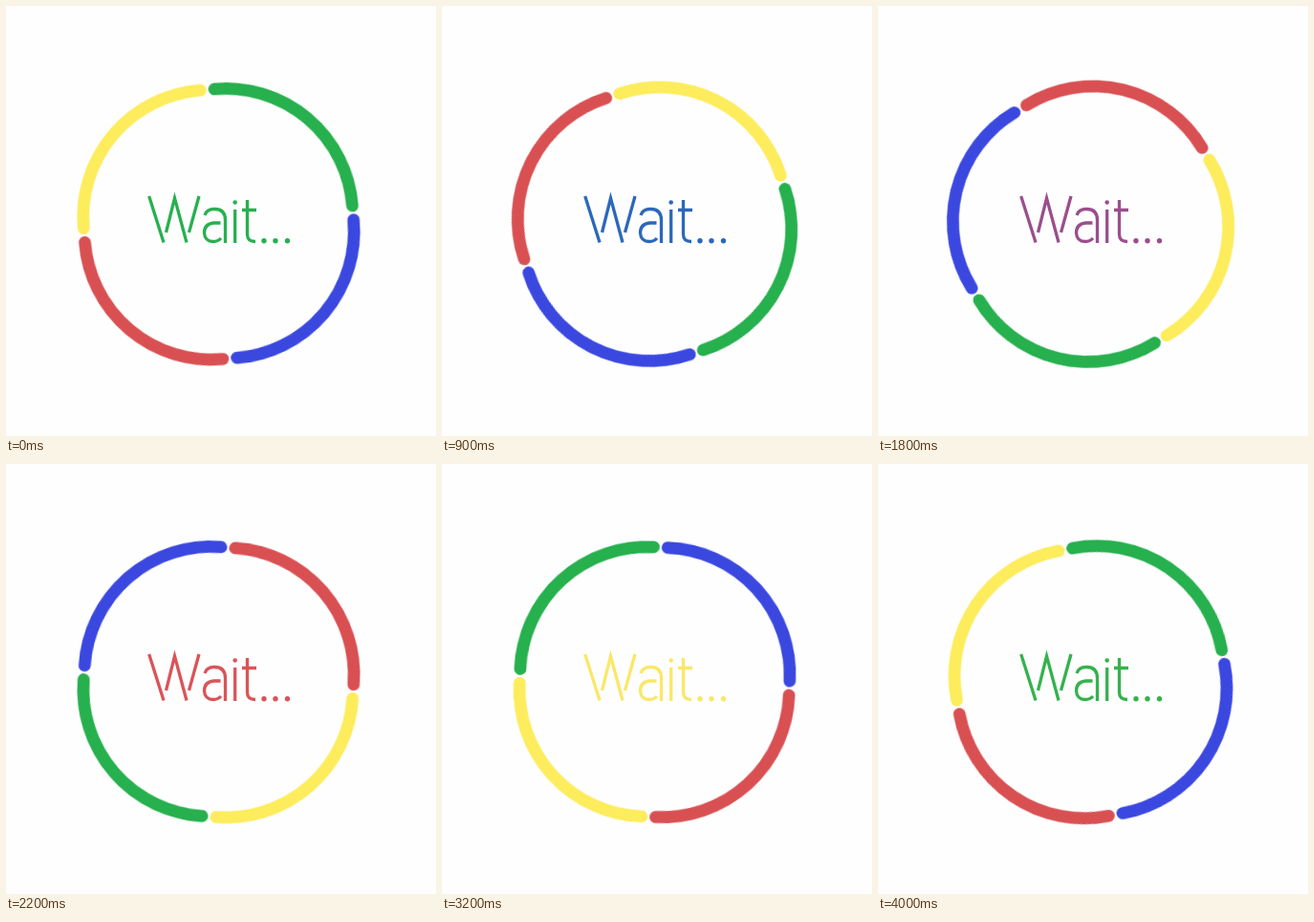
An HTML page for the animation above (4100 ms loop, 450 px wide and 450 px high).

```html
<!DOCTYPE html>
<html lang="en">
<head>
<meta charset="utf-8">
<title>Wait...</title>
<style>
  html, body { margin: 0; width: 100%; height: 100%; overflow: hidden; background: #fefefe; }
  svg { display: block; width: 450px; height: 450px; }
  path { fill: none; stroke-linecap: round; }
  #ring path { stroke-width: 12.8; }
  #word { color: #27b050; stroke: currentColor; stroke-width: 3.3; }
  #word path { stroke-linecap: butt; stroke-linejoin: miter; }
  #word circle { fill: currentColor; stroke: none; }
</style>
</head>
<body>
<svg viewBox="0 0 450 450" role="img" aria-label="Wait...">
  <g transform="translate(222.5 228.2)"><g id="ring"></g></g>
  <g id="word">
    <!-- stencil lettering: W, a, i, t, dots -->
    <path d="M149.7 199L165 247.5M167.5 237L176.5 201L189 247.5M191.5 237L202 199"/>
    <path d="M208 219Q210 212.5 218 212.5Q229.5 212.5 229.5 224V248"/>
    <path d="M224.500 227H217.500Q207.500 228 207.500 237.500Q208 246.500 217 246.500Q222 246.500 225 243"/>
    <path d="M239.700 213V248"/>
    <path d="M252.500 203V239Q252.500 246.500 261 246.500M247 213.500H262"/>
    <circle cx="239.700" cy="205.500" r="2.300"/>
    <circle cx="270" cy="245.700" r="2.700"/>
    <circle cx="282" cy="245.700" r="2.700"/>
    <circle cx="294.500" cy="245.700" r="2.700"/>
  </g>
</svg>
<script>
  const LOOP = 4100, FRAMES = 41, STEPS = 61;
  const ring = document.getElementById('ring');
  const word = document.getElementById('word');

  // Clockwise, each arc a little more curved than the full circle.
  ['#27b04e', '#3b48e0', '#d95053', '#fdec5c'].forEach((color, i) => {
    const arc = document.createElementNS(ring.namespaceURI, 'path');
    arc.setAttribute('d', 'M-94.5 -105A132.8 132.8 0 0 1 94.5 -105');
    arc.setAttribute('stroke', color);
    arc.setAttribute('transform', `rotate(${45 + 90 * i})`);
    ring.append(arc);
  });

  const hues = [
    [0, 39, 176, 80], [900, 43, 104, 186], [1150, 62, 74, 204],
    [1400, 91, 72, 192], [2200, 218, 84, 88], [2700, 248, 165, 98],
    [3200, 250, 231, 104], [4000, 52, 178, 78], [4100, 39, 176, 80]
  ];

  function hueAt(t) {
    const i = hues.findIndex(h => h[0] > t);
    const a = hues[i - 1], b = hues[i];
    const p = (t - a[0]) / (b[0] - a[0]);
    const rgb = [1, 2, 3].map(c => Math.round(a[c] + (b[c] - a[c]) * p));
    return `rgb(${rgb})`;
  }

  // A 61-step turn shown at two thirds of its rate: one and two steps alternate.
  function angleAt(k) {
    const step = k === FRAMES - 1 ? STEPS - 1 : Math.max(0, Math.ceil(1.5 * k) - 1);
    return -4.8 + step * 360 / STEPS;
  }

  function play(el, pose) {
    const keys = Array.from({ length: FRAMES + 1 }, (_, k) => ({
      ...pose(k % FRAMES), offset: k / FRAMES, easing: 'steps(1, end)'
    }));
    el.animate(keys, { duration: LOOP, iterations: Infinity }).startTime = 0;
  }

  play(ring, k => ({ transform: `rotate(${angleAt(k)}deg)` }));
  play(word, k => ({ color: hueAt(k * LOOP / FRAMES) }));
</script>
</body>
</html>
```
